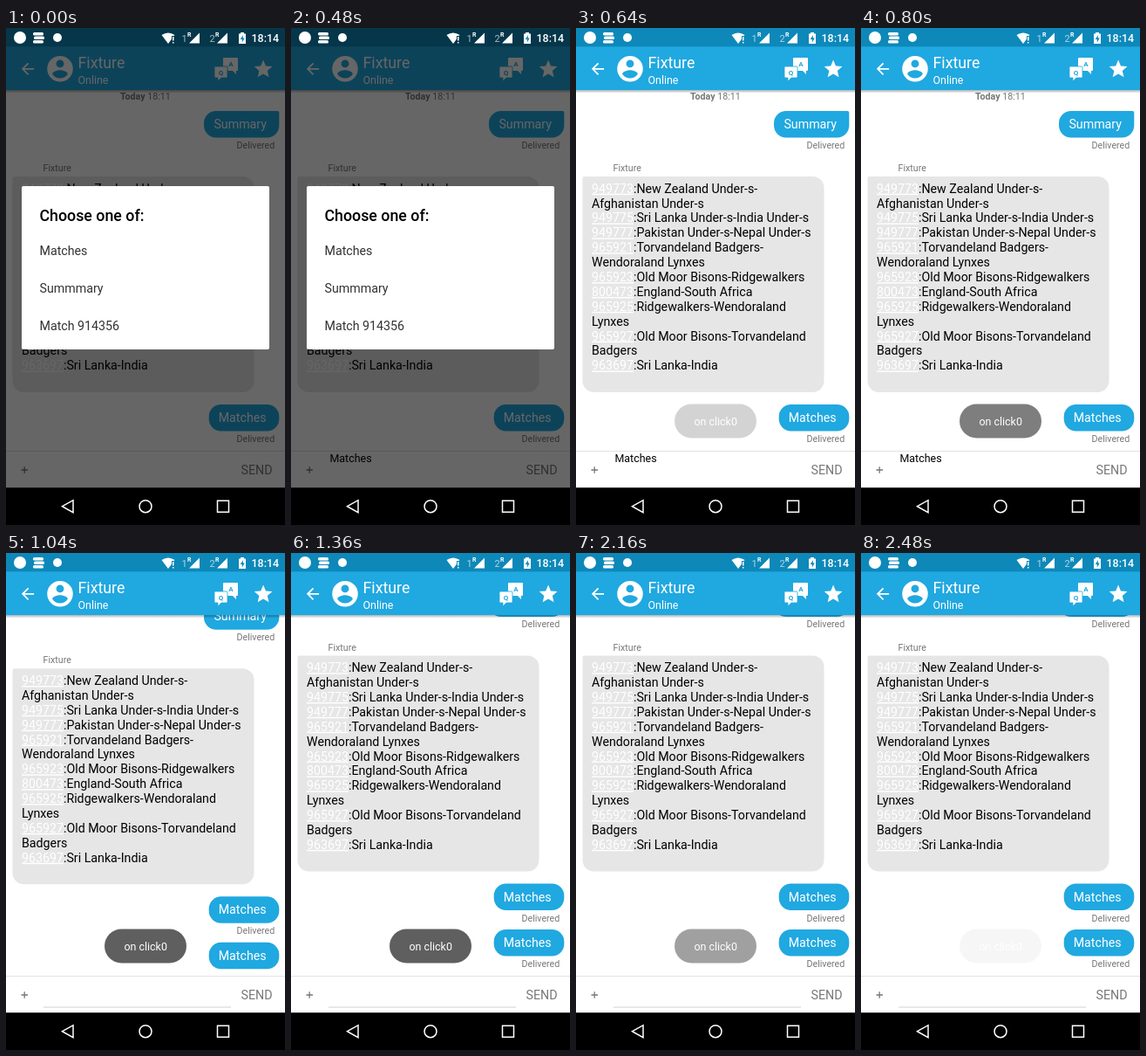
Write an HTML page that moves like this. It is 320 by 569 pixels and loops after 8000 ms.

```html
<!DOCTYPE html>
<html lang="en">
<head>
<meta charset="utf-8">
<title>Chat with match bot</title>
<style>
html, body { margin: 0; width: 100%; height: 100%; overflow: hidden; background: #000; }
svg { display: block; width: 100%; height: 100%; font: 14.22px Roboto, sans-serif; }
.big { font-size: 17.78px; }
.mid { font-size: 12.44px; }
.small { font-size: 10.67px; fill: #777; }
.white { fill: #fff; }
.blue { fill: #20a8e0; }
.line { fill: none; stroke: #fff; stroke-width: 1.5; }
</style>
</head>
<body>
<svg viewBox="0 0 320 569" preserveAspectRatio="none">
  <linearGradient id="shade" x2="0" y2="1">
    <stop stop-opacity=".3"/><stop offset="1" stop-opacity="0"/>
  </linearGradient>
  <rect width="320" height="569" fill="#fff"/>

  <g id="list">
    <text class="small" x="131" y="82"><tspan font-weight="bold">Today</tspan> 18:11</text>
    <path class="blue" d="M241 95H311.300q2 0 2 2V111.500a14 14 0 0 1-14 14H241a14 14 0 0 1-14-14V109a14 14 0 0 1 14-14z"/>
    <text class="white" x="238.400" y="115">Summary</text>
    <text class="small" x="264.500" y="137.500">Delivered</text>
    <text class="small" x="42.500" y="164">Fixture</text>
    <path fill="#e6e6e6" d="M9.500 170H271.500a13 13 0 0 1 13 13V404a13 13 0 0 1-13 13H20.500a13 13 0 0 1-13-13V172q0-2 2-2z"/>
    <g id="matches"></g>
    <rect class="blue" x="232.700" y="431" width="80.600" height="30.500" rx="14"/>
    <text class="white" x="243.700" y="451">Matches</text>
    <text class="small" x="264.500" y="474">Delivered</text>
    <g id="reply">
      <rect class="blue" x="232.700" y="483.500" width="80.600" height="30.500" rx="14"/>
      <text class="white" x="243.700" y="503.500">Matches</text>
      <text id="receipt" class="small" x="264.500" y="526.500">Delivered</text>
    </g>
  </g>

  <!-- input bar -->
  <rect y="484" width="320" height="43" fill="#fff"/>
  <rect y="484" width="320" height="1" fill="#e2e2e2"/>
  <path d="M17.500 506h7.500M21.200 502.200v7.500" stroke="#777" stroke-width="1.300"/>
  <rect id="rule" x="43" y="519.500" width="215" height="1" fill="#d2d2d2"/>
  <text x="269.500" y="511" fill="#777">SEND</text>

  <!-- header -->
  <rect y="71.100" width="320" height="3.600" fill="url(#shade)"/>
  <rect class="blue" y="21" width="320" height="50.100"/>
  <rect width="320" height="21.330" fill="#0d88b9"/>
  <g class="white">
    <path transform="translate(14.300 36.200) scale(.889)" d="M20 11H7.830l5.590-5.590L12 4l-8 8 8 8 1.410-1.410L7.830 13H20z"/>
    <path transform="translate(44.300 29.100) scale(1.475)" d="M12 2a10 10 0 0 0 0 20 10 10 0 0 0 0-20zm0 3a3 3 0 0 1 0 6 3 3 0 0 1 0-6zm0 14.200c-2.500 0-4.710-1.280-6-3.220.03-1.990 4-3.080 6-3.080s5.970 1.090 6 3.080c-1.290 1.940-3.500 3.220-6 3.220z"/>
    <path transform="translate(282.600 34.500) scale(1.040)" d="M12 17.270L18.180 21l-1.640-7.030L22 9.240l-7.190-.61L12 2 9.190 8.630 2 9.240l5.460 4.730L5.820 21z"/>
    <text class="big" x="82.500" y="46">Fixture</text>
    <text class="mid" x="82.500" y="64">Online</text>
    <path d="M250 34h15q1 0 1 1v13q0 1-1 1h-1v4l-4-4h-10q-1 0-1-1v-13q0-1 1-1z"/>
    <path d="M240 44h13q1 0 1 1v11q0 1-1 1h-6l-4 4v-4h-3q-1 0-1-1v-11q0-1 1-1z" stroke="#20a8e0" stroke-width=".8"/>
  </g>
  <g class="blue" font-size="8" font-weight="bold" text-anchor="middle">
    <text x="258" y="44">A</text><text x="246.500" y="53.500">Q</text>
  </g>

  <rect id="dim" width="320" height="527"/>
  <text id="typed" class="mid" x="44.500" y="497">Matches</text>

  <g id="dialog">
    <rect class="white" x="18" y="181" width="284" height="187" rx="2"/>
    <text class="big" x="38.500" y="221" font-weight="500">Choose one of:</text>
    <g fill="#333">
      <text x="38.500" y="260">Matches</text>
      <text x="38.500" y="303">Summmary</text>
      <text x="38.500" y="345.500">Match 914356</text>
    </g>
  </g>

  <g id="toast">
    <rect x="113" y="430.500" width="94" height="39" rx="19.500" fill="#5f5f5f"/>
    <text class="white mid" x="135.500" y="455">on click0</text>
  </g>

  <!-- status icons -->
  <g class="white">
    <circle cx="16" cy="11" r="7"/>
    <rect x="31" y="5" width="12" height="3.500" rx="1.500"/>
    <rect x="32" y="9.500" width="12" height="3.500" rx="1.500"/>
    <rect x="31" y="14" width="12" height="3.500" rx="1.500"/>
    <circle cx="59" cy="11" r="5"/>
    <path d="M178.500 8q7.500-5 15 0L186 18z"/>
    <path d="M190 9h4v9h-4z" fill="#0d88b9" id="gap"/>
    <path d="M191 10h1.500v4.500h-1.500zM191 16h1.500v1.500h-1.500z"/>
    <path d="M222 5.500V17.500H210zM254 5.500V17.500H242z"/>
    <path d="M269 5h4v1.500h2V18h-8V6.500h2z"/>
    <path d="M271.800 8l-3 5h2v3.500l3-5h-2z" fill="#0d88b9"/>
    <text class="mid" x="281.500" y="16" font-weight="500">18:14</text>
    <g font-size="11" opacity=".65"><text x="201.500" y="16">1</text><text x="233.500" y="16">2</text></g>
    <g font-size="7" font-weight="bold"><text x="208" y="10">R</text><text x="240" y="10">R</text></g>
  </g>

  <!-- navigation bar -->
  <rect y="526.200" width="320" height="43"/>
  <path class="line" d="M64.500 547.700L77 540.700V554.700z"/>
  <circle class="line" cx="160" cy="547.700" r="7"/>
  <rect class="line" x="242.500" y="541.200" width="13" height="13"/>
</svg>
<script>
const el = id => document.getElementById(id);
const clamp = v => Math.max(0, Math.min(1, v));
const fade = (id, v) => el(id).setAttribute('opacity', clamp(v));

// Lines with a number start with a link; the others are wrapped text.
const lines = [
  '949773:New Zealand Under-s-', 'Afghanistan Under-s',
  '949775:Sri Lanka Under-s-India Under-s',
  '949777:Pakistan Under-s-Nepal Under-s',
  '965921:Torvandeland Badgers-', 'Wendoraland Lynxes',
  '965923:Old Moor Bisons-Ridgewalkers',
  '800473:England-South Africa',
  '965925:Ridgewalkers-Wendoraland', 'Lynxes',
  '965927:Old Moor Bisons-Torvandeland', 'Badgers',
  '963697:Sri Lanka-India'
];
el('matches').innerHTML = lines.map((line, i) =>
  `<text x="18" y="${188.7 + i * 16.89}">` +
  line.replace(/^\d+/, '<tspan fill="#fff" text-decoration="underline">$&</tspan>') +
  '</text>').join('');

function draw(now) {
  const t = Math.floor(now % 8000 / 80) * 80;
  const sent = t >= 880, settled = t >= 1360;
  const scroll = settled ? 52.5 : sent ? 37.7 : 0;
  el('list').setAttribute('transform', `translate(0 ${-scroll})`);
  fade('reply', sent);
  fade('receipt', settled);
  fade('rule', sent);
  fade('typed', t >= 480 && !sent);

  const dim = 0.6 * clamp((625 - t) / 145);
  fade('dim', dim);
  fade('dialog', (573 - t) / 93);
  el('gap').setAttribute('fill', `rgb(${[13, 136, 185].map(c => c * (1 - dim))})`);
  fade('toast', t < 1920 ? (t - 560) / 300 : 1 - clamp((t - 1920) / 560) * 0.95);
  requestAnimationFrame(() => draw(performance.now()));
}
draw(0);
</script>
</body>
</html>
```
